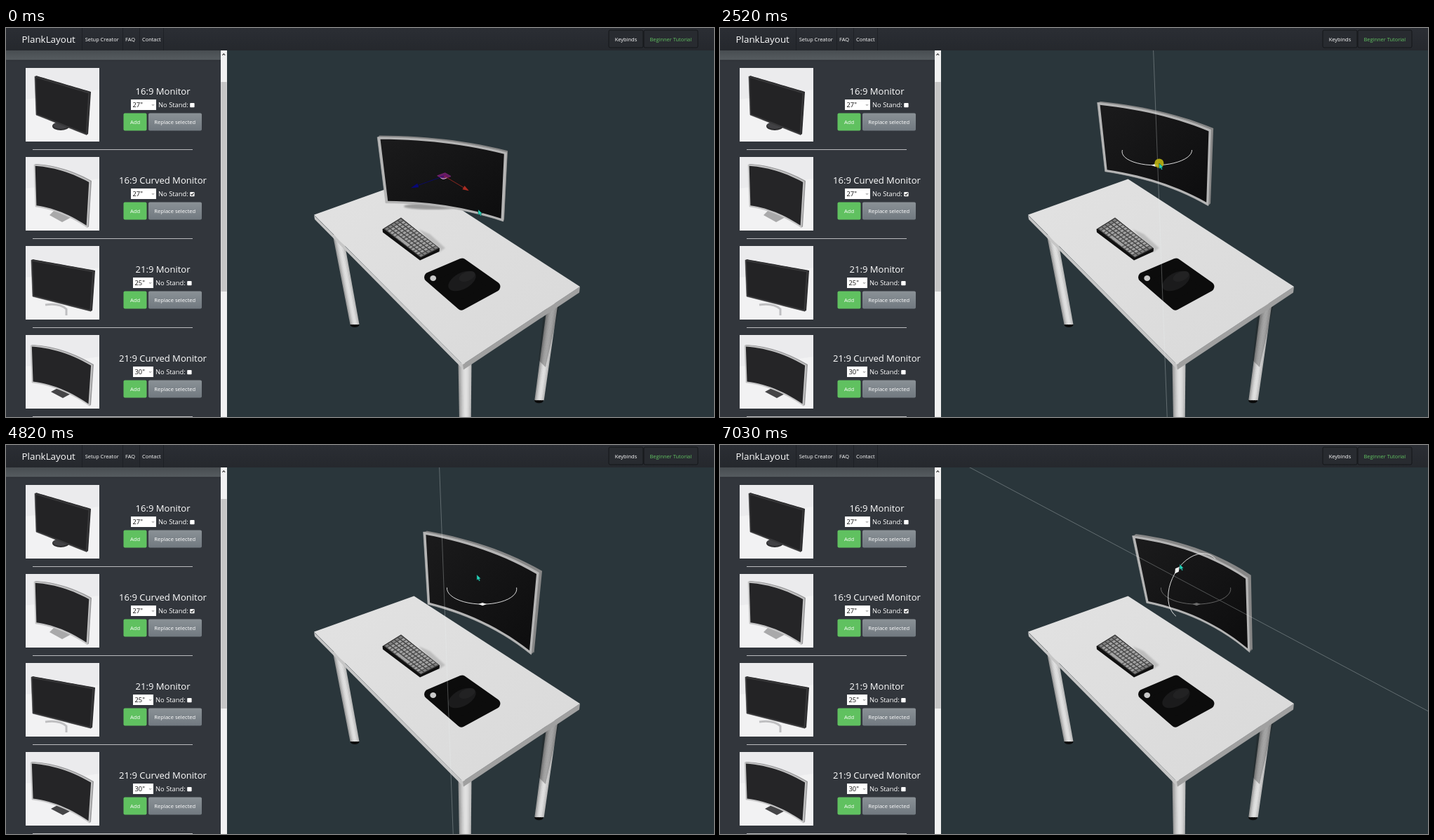
Animation, 1009 px wide and 555 px high, one loop 7.06 s. Source, as an HTML page:

```html
<!DOCTYPE html>
<html lang="en">
<head>
<meta charset="utf-8">
<title>Desk planner</title>
<style>
  html, body { margin: 0; width: 100%; height: 100%; overflow: hidden; background: #2a363b; }
  svg { display: block; width: 1009px; height: 555px; }
  text { font-family: "Open Sans", "Noto Sans", sans-serif; }
</style>
</head>
<body>
<svg viewBox="0 0 1009 555">
  <defs>
    <linearGradient id="bar" x2="0" y2="1"><stop stop-color="#2b2e34"/><stop offset="1" stop-color="#25282d"/></linearGradient>
    <linearGradient id="strip" x2="0" y2="1"><stop stop-color="#484d51"/><stop offset="1" stop-color="#565c60"/></linearGradient>
    <linearGradient id="grey" x2="0" y2="1"><stop stop-color="#8a9196"/><stop offset="1" stop-color="#717980"/></linearGradient>
    <linearGradient id="top" x2="1" y2="1"><stop stop-color="#e2e2e2"/><stop offset="1" stop-color="#d9d9d9"/></linearGradient>
    <linearGradient id="glass" x2="1" y2="1"><stop stop-color="#1b1b1c"/><stop offset="1" stop-color="#0d0d0e"/></linearGradient>
    <filter id="soft"><feGaussianBlur stdDeviation="1.2"/></filter>
  </defs>
  <g id="scene"></g>
  <g id="live"></g>
  <g id="panel"></g>
</svg>
<script>
const LOOP = 7060;
const el = id => document.getElementById(id);
const lerp = (a, b, k) => a + (b - a) * k;
const ramp = (t, from, to) => Math.min(1, Math.max(0, (t - from) / (to - from)));

const rect = (x, y, w, h, fill, more = '') => `<rect x="${x}" y="${y}" width="${w}" height="${h}" fill="${fill}" ${more}/>`;
const poly = (points, fill, more = '') => `<polygon points="${points}" fill="${fill}" ${more}/>`;
const path = (d, stroke, width, more = '') => `<path d="${d}" fill="none" stroke="${stroke}" stroke-width="${width}" ${more}/>`;
const line = (a, b, stroke, width) => path(`M${a}L${b}`, stroke, width);
const oval = (x, y, rx, ry, fill, more = '') => `<ellipse cx="${x}" cy="${y}" rx="${rx}" ry="${ry}" fill="${fill}" ${more}/>`;
const label = (x, y, size, str, fill = '#fff', anchor = 'start') =>
  `<text x="${x}" y="${y}" font-size="${size}" fill="${fill}" text-anchor="${anchor}">${str}</text>`;

// Camera space: x right, y down, z forward. The camera looks down by TILT on a desk turned by TURN.
const FOCAL = 631, TILT = .6, TURN = .885, DEPTH = 640;
const project = ([x, y, z]) => [662 + FOCAL * x / z, 293.5 + FOCAL * y / z].map(v => +v.toFixed(2));
const along = (p, v, k) => p.map((c, i) => c + v[i] * k);
const mix = (v, w, angle) => v.map((c, i) => c * Math.cos(angle) + w[i] * Math.sin(angle));
const negate = v => v.map(c => -c);
const RIGHT = [1, 0, 0];
const AHEAD = [0, -Math.sin(TILT), Math.cos(TILT)];
const UP = [0, -Math.cos(TILT), -Math.sin(TILT)];
const axes = { x: mix(RIGHT, AHEAD, -TURN), y: UP, z: mix(RIGHT, AHEAD, Math.PI + Math.PI / 2 - TURN) };
const RAISED = [-39.6, -121.1, DEPTH];

// at(u, v, d) gives the screen point across, down and behind the front face
function monitor(at, face, side, glass) {
  const outline = (rim, d) => {
    const n = 14, pts = [];
    for (let i = 0; i <= n; i++) pts.push(at(lerp(rim, 1 - rim, i / n), rim * 1.4, d));
    for (let i = n; i >= 0; i--) pts.push(at(lerp(rim, 1 - rim, i / n), 1 - rim * 1.7, d));
    return pts.join(' ');
  };
  let out = '';
  for (let k = 3; k; k--) out += poly(outline(0, k / 3), side);
  return out + poly(outline(0, 0), face, `stroke="${face}" stroke-width=".6"`) + poly(outline(.02, 0), glass);
}

function deskMonitor(pivot, yaw, pitch) {
  const across = mix(RIGHT, AHEAD, -yaw), back = mix(AHEAD, RIGHT, yaw);
  const tall = mix(UP, negate(back), pitch), behind = mix(back, UP, pitch);
  const at = (u, v, d) => {
    const s = 2 * u - 1, bend = 14 * (1 - s * s) - 13;
    return project(along(along(along(pivot, across, 96.2 * s), tall, 55.5 * (1 - 2 * v)), behind, bend + 6 * d));
  };
  return monitor(at, '#b5b5b5', '#868686', 'url(#glass)');
}

function thumbMonitor({ x, y, w, h, drop, bow = 0, light }) {
  const at = (u, v, d) => [
    x + u * w + v * (2 - 6 * u) + 2 * d,
    y + u * drop + v * h * (1 + .1 * u) - bow * 4 * u * (1 - u) - d,
  ];
  return light ? monitor(at, '#c4c4c5', '#9b9b9d', '#252527') : monitor(at, '#38383a', '#2b2b2d', '#232325');
}

// round leg: strips shaded across its width
function leg(x1, y1, x2, y2, w) {
  const strips = 9;
  let s = '';
  for (let i = 0; i < strips; i++) {
    const u = (i + .5) / strips - .5, g = Math.round(140 + 85 * Math.cos((u - .08) * 2.6));
    s += line([x1 + u * w * 1.15, y1], [x2 + u * w, y2], `rgb(${g},${g},${g})`, w / strips + .7);
  }
  return s;
}

function keyboard() {
  const key = (u, v) => [lerp(lerp(563, 617, u), lerp(539, 591, u), v), lerp(lerp(271.5, 313.5, u), lerp(286.5, 327, u), v)];
  const cap = (u0, u1, v, fill) => poly([key(u0, v), key(u1, v), key(u1, v + .14), key(u0, v + .14)].join(' '), fill);
  let s = poly('588,287 604,294 626,314 617,320', '#bdbdbd', 'filter="url(#soft)"');
  s += poly('536.5,287 563,270.5 618,314.5 617.5,319 590,331.5 537,291.5', '#101010');
  s += poly('538,286.5 563,271 617.5,314 591,327.5', '#4a4a4a');
  for (let r = 0; r < 5; r++) for (let c = 0; c < 14; c++) {
    s += cap((c + .12) / 14, (c + .85) / 14, (r + .15) / 5, c % 13 ? '#a3a3a3' : '#808080');
  }
  return s + cap(.3, .63, .83, '#a3a3a3');
}

function desk() {
  let s = rect(315, 32, 694, 523, '#2a363b');
  s += oval(497, 423.5, 6.3, 3.6, '#0a0a0a') + oval(759.5, 531.5, 6.3, 3.8, '#0a0a0a');
  s += leg(473, 295, 497, 423, 12.2) + leg(779, 393, 760, 531, 12.6) + leg(654, 478, 654.3, 556, 16);
  s += poly('768,390 790,390 769,484 759,474', '#1c1c1c', 'opacity=".3"');
  s += poly('439,267 651,480 652,487.5 440,273', '#c6c6c6');
  s += poly('651,480 818,369 817,377.5 652,487.5', '#a0a0a0');
  s += poly('439,266.5 581.5,215.5 818,369 651,480', 'url(#top)');
  s += keyboard();
  s += poly('603,355.5 650,335.5 697.5,369 649,395.5', '#0c0c0c', 'stroke="#0c0c0c" stroke-width="14" stroke-linejoin="round"');
  s += oval(608.7, 357, 4.4, 4, '#c9c9c9');
  s += oval(650, 361, 21.5, 11.5, '#1b1b1c', 'transform="rotate(-28 650 361)"');
  return s + oval(657, 354.5, 12, 6.5, '#222223', 'transform="rotate(-22 657 354.5)"');
}

const cards = [
  { name: '16:9 Monitor', size: 27, screen: { x: 41, y: 23, w: 78, h: 55, drop: 23 },
    stand: poly('72,82 81,82 82,94 72,94', '#303032') + oval(78, 94, 12, 6, '#2c2c2e') + oval(78, 93, 11, 5, '#414144') },
  { name: '16:9 Curved Monitor', size: 27, checked: true, screen: { x: 40, y: 22, w: 80, h: 60, drop: 24, bow: 5, light: true },
    stand: poly('70,86 62,94 80,104 93,97 88,88', '#a9a9aa') },
  { name: '21:9 Monitor', size: 25, screen: { x: 36, y: 31, w: 89, h: 52, drop: 16 },
    stand: path('M56,95Q76,92 86,101L86,110', '#bfbfc1', 3) },
  { name: '21:9 Curved Monitor', size: 30, screen: { x: 35, y: 26, w: 88, h: 53, drop: 28, bow: 6, light: true },
    stand: poly('64,92 77,85 94,94 81,101', '#454547') },
];

function card(c, i) {
  const w = c.size == 27 ? 36 : 29, x = c.size == 27 ? 178 : 181, box = x + w + 48;
  let s = rect(28, 11, 105, 105, '#ebebed') + poly('28,56 133,42 133,116 28,116', '#f2f2f3') + c.stand + thumbMonitor(c.screen);
  s += label(223.5, 48.5, 13.05, c.name, '#fff', 'middle');
  s += rect(x, 56, w, 15, '#fff') + label(x + 2.5, 67.4, 9.4, c.size + '"', '#111');
  s += path(`M${x + w - 6},63l1.5,1.5l1.5,-1.5`, '#444', .7);
  s += label(x + w + 3, 67.4, 9.4, 'No Stand:') + rect(box + .2, 60.9, 6.4, 6.4, '#fff', 'rx="1"');
  if (c.checked) s += path(`M${box + 1.5},64l1.5,1.7l2.5,-3.3`, '#222', 1.1);
  s += rect(167.5, 75.5, 33, 25, '#60c160', 'rx="2"') + label(184, 90.7, 7.6, 'Add', '#fff', 'middle');
  s += rect(203, 75.5, 76, 25, 'url(#grey)', 'rx="2"') + label(240.8, 90.7, 7.6, 'Replace selected', '#fff', 'middle');
  s += rect(38, 127, 228, .9, '#c9cacc');
  return `<g transform="translate(0 ${46 + 127 * i})">${s}</g>`;
}

function panel() {
  let s = rect(0, 32, 306, 523, '#32363c') + rect(0, 32, 306, 14, 'url(#strip)') + rect(0, 45.6, 306, .8, '#24272b');
  s += cards.map(card).join('');
  s += rect(306, 32, 9, 523, '#f1f1f1') + rect(306.4, 77, 8.2, 299, '#c6c6c6') + path('M308.4,38.8l1.9,-2l1.9,2', '#333', 1.1);
  s += rect(0, 0, 1009, 32, 'url(#bar)');
  for (const x of [108, 166, 190, 224]) s += rect(x, 0, .8, 32, '#1c1f23');
  s += label(22.5, 21, 13.4, 'PlankLayout');
  s += label(112.7, 18.8, 7.45, 'Setup Creator') + label(170, 18.8, 7.45, 'FAQ') + label(194, 18.8, 7.45, 'Contact');
  for (const [x, w] of [[859, 49], [909, 77]]) s += rect(x, 3, w, 25, '#282b30', 'rx="2" stroke="#131518" stroke-width=".9"');
  return s + label(883.5, 18.8, 7.45, 'Keybinds', '#fff', 'middle') + label(947.3, 18.8, 7.45, 'Beginner Tutorial', '#62c462', 'middle');
}

// [time, x, y]
const cursorStops = [
  [0, 673, 259], [50, 673, 259], [260, 655, 226], [650, 617, 160], [850, 617, 160], [1380, 616, 121], [1600, 616, 121],
  [2250, 622, 193], [2670, 628, 193], [3320, 653, 194], [3976, 705, 223], [4200, 640, 216], [4820, 671, 185],
  [5200, 646, 185], [5405, 646, 185], [5960, 653, 171], [6130, 653, 171], [6600, 655, 170], [LOOP, 655, 170],
];
// [start, active handle]
const activeSteps = [
  [0, 'plane'], [150, 'x'], [320, 'y'], [1650, 'none'], [1720, 'x'], [1860, 'none'], [2200, 'yaw'], [2850, 'none'],
  [3090, 'x'], [4040, 'none'], [4120, 'z'], [4280, 'none'], [4540, 'yaw'], [5200, 'pitch'],
];
const guideAxis = { x: 'x', y: 'y', z: 'z', yaw: 'y', pitch: 'x' };
const grabs = [[780, 1600], [2230, 2700], [3300, 4000], [5390, 6620]];
const rotating = t => t >= 1890 && t < 2850 || t >= 4300;

function cursorAt(t) {
  const i = cursorStops.findLastIndex(s => s[0] <= t), [t0, x0, y0] = cursorStops[i], [t1, x1, y1] = cursorStops[i + 1];
  const k = ramp(t, t0, t1);
  return [lerp(x0, x1, k), lerp(y0, y1, k)];
}

// handles keep their size on screen, so lengths grow with depth
function moveGizmo(pivot, active) {
  const size = pivot[2] / DEPTH, idle = active == 'plane' || active == 'none';
  const colors = { x: '#a92c22', z: '#080878', y: '#f4f4f4' };
  const corner = (a, b) => project(along(along(pivot, axes.x, a * 7 * size), axes.z, b * 7 * size));
  let s = poly([corner(1, 1), corner(1, -1), corner(-1, -1), corner(-1, 1)].join(' '),
    idle ? '#651863' : '#2b2b2b', `stroke="${idle ? '#8b2b85' : '#4a4a4a'}" stroke-width=".7"`);
  if (active == 'plane') s += path(`M${corner(0, 1)}Q${corner(1.3, 1.3)} ${corner(1, 0)}`, '#d9c4dc', 1);
  for (const name of active == 'y' ? ['z', 'x', 'y'] : ['z', 'x']) {
    const color = name == active ? '#f4f4f4' : idle ? colors[name] : '#858585';
    const on = k => project(along(pivot, axes[name], k * size));
    const [bx, by] = on(45), [tx, ty] = on(57), len = Math.hypot(tx - bx, ty - by);
    const nx = (ty - by) / len * 3, ny = (bx - tx) / len * 3;
    s += line(on(0), [bx, by], color, .8) + poly(`${tx},${ty} ${bx + nx},${by + ny} ${bx - nx},${by - ny}`, color);
  }
  return s;
}

// half circle from side over toward to the opposite side, with a diamond in the middle
function arc(pivot, side, toward, color) {
  const at = (angle, r) => project(along(pivot, mix(side, toward, angle), r * pivot[2] / DEPTH));
  const pts = Array.from({ length: 25 }, (_, i) => at(Math.PI * i / 24, 50.3));
  const mid = Math.PI / 2;
  return path('M' + pts.join('L'), color, .9) +
    poly([at(mid, 46), at(mid - .11, 50.3), at(mid, 54.5), at(mid + .11, 50.3)].join(' '), color);
}

function turnGizmo(pivot, active) {
  const tone = name => name == active ? '#f2f2f2' : '#6c6c6c';
  let s = arc(pivot, RIGHT, negate(AHEAD), tone('yaw'));
  if (active != 'yaw') s += arc(pivot, mix(UP, negate(axes.z), .824), mix(axes.z, UP, .824), tone('pitch'));
  return s;
}

function frame(t) {
  const lift = ramp(t, 850, 1380);
  const yaw = lerp(.285, .756, ramp(t, 2250, 2670));
  const slide = 86 * ramp(t, 3320, 3976);
  const pitch = .48 * ramp(t, 5405, 5960) - .31 * ramp(t, 6130, 6600);
  const home = along(RAISED, UP, 41.8 * (lift - 1)), pivot = along(home, axes.x, slide);
  const active = activeSteps.findLast(s => s[0] <= t)[1], guide = axes[guideAxis[active]];
  const [mx, my] = cursorAt(t);
  let s = '';
  if (yaw < .3) s += oval(lerp(608, 620, lift), lerp(254.5, 242.5, lift), lerp(41, 7, lift), lerp(4.5, 1.8, lift), '#999', 'filter="url(#soft)"');
  s += deskMonitor(pivot, yaw, pitch);
  if (guide) s += line(project(along(home, guide, -900)), project(along(home, guide, 900)), 'rgba(235,240,240,.42)', .7);
  s += rotating(t) ? turnGizmo(pivot, active) : moveGizmo(pivot, active);
  if (grabs.some(([a, b]) => t >= a && t < b)) s += oval(mx, my, 6.6, 6.6, '#b9b012', 'opacity=".92"');
  s += `<path transform="translate(${mx} ${my})" d="M0,0V8L1.9,6.6L3.3,9.3L4.7,8.6L3.5,6L5.6,5.6Z" fill="#25d3b9" stroke="#12302f" stroke-width=".5"/>`;
  el('live').innerHTML = s;
}

el('scene').innerHTML = desk();
el('panel').innerHTML = panel();
const start = performance.now();
function tick() {
  frame((performance.now() - start) % LOOP);
  requestAnimationFrame(tick);
}
tick();
</script>
</body>
</html>
```
